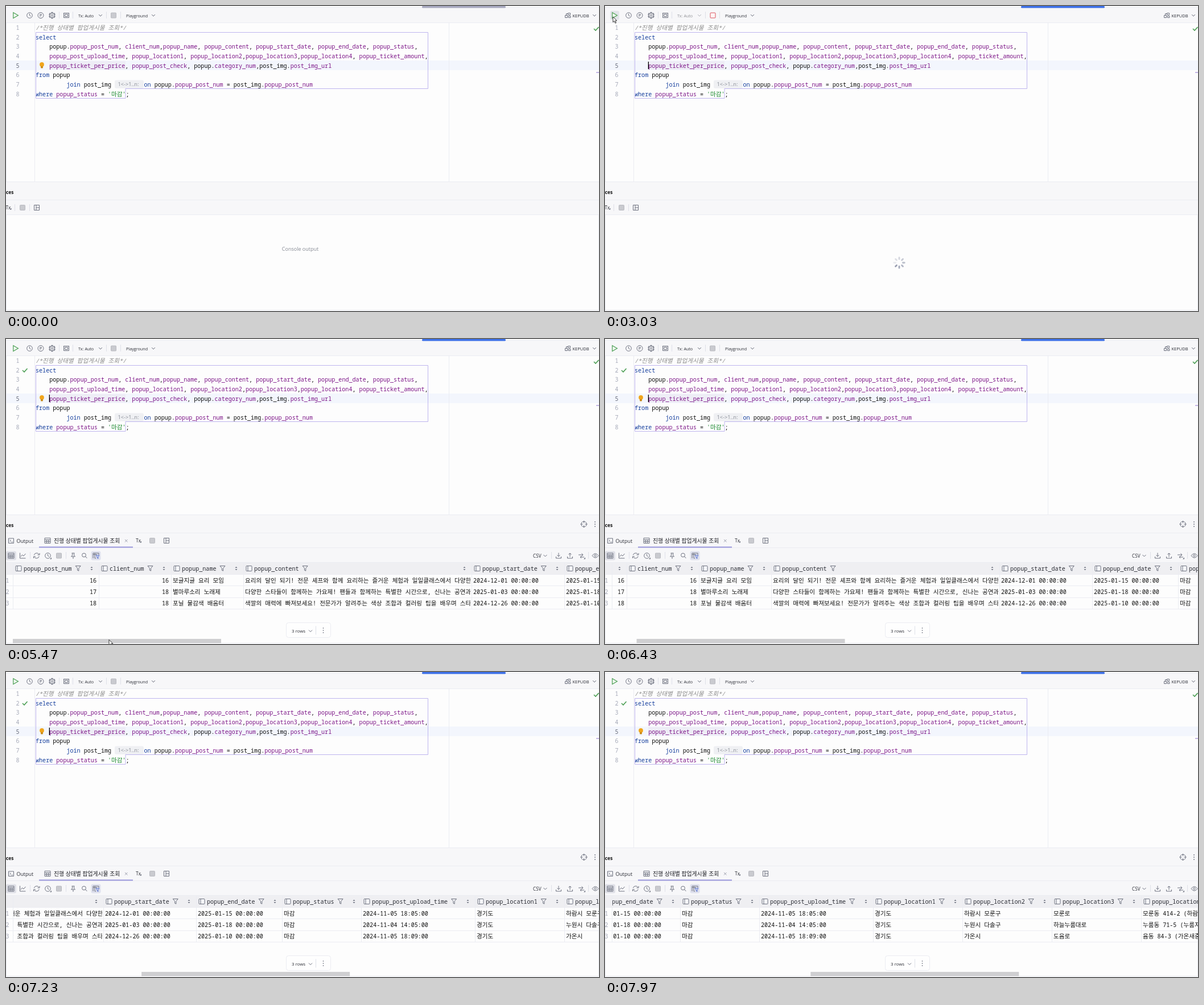
Recreate the animation shown at these times as an HTML page. Size 1042x537 px, loop 8 s.

```html
<!DOCTYPE html>
<html lang="ko">
<head>
<meta charset="utf-8">
<title>SQL console</title>
<style>
html, body { margin: 0; width: 100%; height: 100%; overflow: hidden; background: #fdfdfd; }
svg { display: block; width: 1042px; height: 537px; }
text { white-space: pre; font-family: "Open Sans", "Noto Sans CJK KR", sans-serif; }
.mono { font-family: "Noto Sans Mono", "Noto Sans CJK KR", monospace; font-size: 10.08px; }
</style>
</head>
<body>
<svg id="stage" viewBox="0 0 1042 537"></svg>
<script>
const LOOP = 8000, FOCUS = 2450, RUN = 2570, DONE = 4350;
const INK = '#6c707e', LINE = '#ebecf2', PANEL = '#f7f7f9', GREEN = '#4c9f54';

// Markup helpers
const rect = (x, y, w, h, fill, more = '') => `<rect x="${x}" y="${y}" width="${w}" height="${h}" fill="${fill}" ${more}/>`;
const path = (d, stroke = INK, fill = 'none', width = 1) => `<path d="${d}" stroke="${stroke}" fill="${fill}" stroke-width="${width}"/>`;
const circle = (x, y, r, stroke = INK, fill = 'none') => `<circle cx="${x}" cy="${y}" r="${r}" stroke="${stroke}" fill="${fill}"/>`;
const hangul = s => s.replace(/[가-힣]+/g, m => `<tspan font-size="10.57">${m}</tspan>`);
const mono = (x, y, s, fill = '#111', more = '') => `<text class="mono" x="${x}" y="${y}" fill="${fill}" ${more}>${hangul(s)}</text>`;
const label = (x, y, s, size, fill = '#2b2d35', more = '') => `<text x="${x}" y="${y}" font-size="${size}" fill="${fill}" ${more}>${s}</text>`;
const group = (id, body) => `<g id="${id}">${body}</g>`;

// Icons, placed by their centre
const chevron = (x, y) => path(`M${x - 3} ${y - 1.5}l3 3 3-3`);
const divider = (x, y, h = 12) => path(`M${x + .5} ${y - h / 2}v${h}`, '#dfe0e8');
const check = (x, y) => path(`M${x - 4} ${y}l3 3 5.5-6`, GREEN, 'none', 1.6);
const clock = (x, y) => circle(x, y, 4.8) + path(`M${x} ${y - 3}v3.2l2.2 1.3`);
const stopped = (x, y) => rect(x - 4.5, y - 4.5, 9, 9, '#c9cacf', 'rx="1" stroke="#b9bac0"');
const panes = (x, y) => path(`M${x - 4.5} ${y - 4.5}h9v9h-9zM${x - 1} ${y - 4.5}v9M${x - 1} ${y}h5.5`);
const table = (x, y) => path(`M${x - 5} ${y - 4.5}h10v9h-10zM${x - 5} ${y - 1.5}h10M${x - 5} ${y + 1.5}h10M${x - 1.7} ${y - 1.5}v6M${x + 1.7} ${y - 1.5}v6`);
const kebab = (x, y) => [-4, 0, 4].map(d => circle(x, y + d, .5, INK, INK)).join('');
const column = (x, y) => rect(x - 5, y - 4.5, 10, 9, '#f7f8fb', `rx="1" stroke="${INK}"`) + path(`M${x - 2} ${y - 4.5}v9`);
const funnel = (x, y) => path(`M${x - 4.5} ${y - 4.5}h9l-3.4 4.2v4.5l-2.2-1v-3.5z`);
const sorter = (x, y) => path(`M${x - 2} ${y - 1}l2-2.2 2 2.2zM${x - 2} ${y + 1}l2 2.2 2-2.2z`, 'none', INK);
const gear = (x, y) => [0, 60, 120].map(a => `<g transform="rotate(${a} ${x} ${y})">${path(`M${x - 1.3} ${y - 4}v-1.3h2.6v1.3M${x - 1.3} ${y + 4}v1.3h2.6v-1.3`)}</g>`).join('') + circle(x, y, 4) + circle(x, y, 1.5);

// Editor
const code = [
  '/*진행 상태별 팝업게시물 조회*/',
  'select',
  '    popup.popup_post_num, client_num,popup_name, popup_content, popup_start_date, popup_end_date, popup_status,',
  '    popup_post_upload_time, popup_location1, popup_location2,popup_location3,popup_location4, popup_ticket_amount,',
  '    popup_ticket_per_price, popup_post_check, popup.category_num,post_img.post_img_url',
  'from popup',
  '         join post_img ',
  "where popup_status = '마감';"
];
const wordColor = w =>
  w[0] === "'" ? '#16862a' :
  /^(select|from|join|on|where)$/.test(w) ? '#123c9c' :
  /^(popup|post_img)$/.test(w) ? '#111' : '#7d1688';
const paint = s => s.replace(/'[^']*'|\w+/g, w => `<tspan fill="${wordColor(w)}">${w}</tspan>`);
const source = (x, y, s) => mono(x, y, paint(s));
const base = i => Math.round(42 + 16.65 * i);

const editor = () =>
  rect(0, 96, 1042, 17, '#f3f6fd') + rect(76, 97, 134, 15, '#eeedf6') +
  path('M.5 29V309M50.5 29V309M778.5 29V309', LINE) +
  code.map((s, i) =>
    mono(17.5, base(i), String(i + 1), i === 4 ? '#686c7c' : '#a5a9b8') +
    (i ? source(52, base(i), s) : mono(52, base(i), s, '#8c8c8c', 'font-style="italic"'))).join('') +
  rect(191, 130.5, 51, 14.5, '#eff0f3', 'rx="3"') + label(196.5, 141, '1&lt;-&gt;1..n:', 9.2, '#868a94') +
  source(242.5, base(6), 'on popup.popup_post_num = post_img.popup_post_num') +
  path('M52.5 46.5H741.5V145.5H210V162.5H52.5Z', '#beb5ee') +
  check(1037, 40) + path('M1037 117h5', '#b3a0e0', 'none', 1.5);

const toolbar = () =>
  rect(0, 3, 1042, 26, PANEL) + path('M0 2.5H1042M0 29.5H1042', LINE) +
  rect(731, 0, 147, 3.5, '#a8a9c0', 'id="tab" rx="1.5"') +
  group('hover', rect(9, 8.5, 16, 16, '#e2e4ea', 'rx="3"')) +
  path('M12.8 11.5v10l8.6-5z', GREEN, '#f0f8f0', 1.2) +
  clock(41.5, 16.5) + circle(61, 16.5, 5) + label(58.8, 19.3, 'P', 7.5, INK, 'font-weight="600"') + gear(81, 16.5) +
  divider(93, 16) + path('M101.5 12.5h9v8h-9zM103.5 14.5h5v4h-5zM101 12.5h10') + divider(117, 16) +
  group('tx', label(127, 19.5, 'Tx: Auto', 7.2) + chevron(166, 16.5)) + divider(176, 16) +
  group('idle', stopped(189, 16.5)) +
  group('stop', rect(185, 12, 9, 9, '#fff5f5', 'rx="1" stroke="#d9535f"')) +
  divider(201, 16) + label(211, 19.5, 'Playground', 7.2) + chevron(259, 16.5) +
  path('M982.5 16.5h4v4h-4zM987.5 12.5h4v3h-4zM988.5 17.5h3.5v3h-3.5zM984.5 16v-2.5h3') +
  label(995.5, 19.5, 'KEPUDB', 7.5) + chevron(1034, 16.5);

const frame = () =>
  rect(0, 309.5, 1042, 58, PANEL) + path('M0 309.5H1042M0 341.5H1042M0 367.5H1042M0 535.5H1041.5V368M.5 368V535', LINE) +
  label(0, 331, 'ces', 8.4, '#111', 'font-weight="700"');

const txIcon = x => label(x, 358, 'Tx', 8.5) + path(`M${x + 10} 355.5v3h-3z`, 'none', INK);

const blank = () =>
  txIcon(-.5) + divider(15, 355) + stopped(29, 355) + divider(41, 355) + panes(54, 355);

const spinner = () => [...Array(8)].map((_, k) =>
  `<rect class="spoke" x="522" y="450.6" width="5.6" height="2.8" rx="1.4" fill="#9a9fb2" transform="rotate(${k * 45} 517 452)"/>`).join('');

// Result grid: [left edge, name, cells]
const stamp = (...days) => days.map(d => d + ' 00:00:00');
const columns = [
  [12, 'popup_post_num', ['16', '17', '18']],
  [163, 'client_num', ['16', '18', '18']],
  [290, 'popup_name', ['보글지글 요리 모임', '별마루소리 노래제', '포닐 물감색 배움터']],
  [417, 'popup_content', [
    '요리의 달인 되기! 전문 셰프와 함께 요리하는 즐거운 체험과 일일클래스에서 다양한',
    '다양한 스타들이 함께하는 가요제! 팬들과 함께하는 특별한 시간으로, 신나는 공연과',
    '색깔의 매력에 빠져보세요! 전문가가 알려주는 색상 조합과 컬러링 팁을 배우며 스타']],
  [818, 'popup_start_date', stamp('2024-12-01', '2025-01-03', '2024-12-26')],
  [981, 'popup_end_date', stamp('2025-01-15', '2025-01-18', '2025-01-10')],
  [1132, 'popup_status', ['마감', '마감', '마감']],
  [1271, 'popup_post_upload_time', ['2024-11-05 18:05:00', '2024-11-04 14:05:00', '2024-11-05 18:09:00']],
  [1471, 'popup_location1', ['경기도', '경기도', '경기도']],
  [1628, 'popup_location2', ['하람시 모룬구', '누원시 다솔구', '가온시']],
  [1785, 'popup_location3', ['모룬로', '하늘누룸대로', '도윰로']],
  [1942, 'popup_location4', ['모룬동 414-2 (하람', '누룸동 71-5 (누룸지', '윰동 84-3 (가온새중']],
  [2100]
];
const rowBase = i => 429 + 20 * i;

const grid = () => columns.slice(0, -1).map(([x, name, cells], n) => {
  const end = columns[n + 1][0];
  const body = cells.map((s, i) => n < 2
    ? mono(end - 4, rowBase(i), s, '#111', 'text-anchor="end"')
    : mono(x + 3, rowBase(i), s)).join('');
  return `<clipPath id="col${n}"><rect x="${x}" y="393" width="${end - x - 2}" height="83"/></clipPath>` +
    `<g clip-path="url(#col${n})">${body}</g>` +
    column(x + 10, 404) + mono(x + 19, 408, name, '#2b2d35') +
    funnel(x + 30 + name.length * 6.05, 404) + sorter(end - 12.5, 404) + path(`M${end + .5} 393V475`, LINE);
}).join('');

const results = () =>
  circle(1015.5, 326, 4.8) + path('M1015.5 320v4M1015.5 328v4M1009.5 326h4M1017.5 326h4') + kebab(1035, 326) +
  path('M4.5 351h9v8.5h-9zM6.5 353.5l2 1.7-2 1.7M9.5 357.5h2.5') + label(18.5, 359, 'Output', 8.9) +
  table(73, 355) + label(84, 359, '진행 상태별 팝업게시물 조회', 9.85, '#1e1f25') +
  path('M209 353l4.5 4.5M213.5 353l-4.5 4.5', '#9a9dab') + rect(58, 365.5, 165, 2, '#9a98dc') +
  txIcon(228) + stopped(257, 355) + panes(282, 355) +
  rect(0, 368, 1041, 25, PANEL) +
  rect(0, 373.5, 18, 16, '#dfe0e7', 'rx="3"') + table(9, 381.5) +
  path('M24.5 376.5v9.5h10M26 383l2.5-3 2.5 2 3.5-4') + divider(42, 381) +
  path('M49.3 380.5a4.7 4.7 0 0 1 8.5-1.5M58.2 382.5a4.7 4.7 0 0 1-8.5 1.5M55.5 380h3.5v-3M52 383h-3.5v3') +
  clock(73.5, 381.5) + path('M80 384.5v3h-3z', 'none', INK) + stopped(93, 381.5) + divider(105, 381) +
  path('M115.5 377h5M116.5 377v4l-2 2h7l-2-2v-4M118 383v4') +
  circle(137, 380.5, 3.4) + path('M139.6 383l2.8 3') +
  rect(149.5, 373.5, 17, 16, '#dfe1ee', 'rx="3"') + path('M153 386v-9h10v3M153 379.5h7M156 377v9h2') +
  path('M158 381h6l-2 2.5v3l-1.8-1v-2z', '#5570d0') +
  label(926, 384.5, 'CSV', 8.2) + chevron(947.5, 381.5) + divider(958, 381) +
  path('M971 376.5v6M968.5 380.5l2.5 2.5 2.5-2.5M966.5 383v3h9v-3') +
  path('M991 383.5v-6M988.5 379.5l2.5-2.5 2.5 2.5M986.5 383v3h9v-3') +
  path('M1006 380h8M1011.5 377.5l2.5 2.5-2.5 2.5M1016 384h-7M1011 382l-2 2 2 2') + path('M1018 384.5v3h-3z', 'none', INK) + divider(1023, 381) +
  path('M1030 381.5q5.5-7.5 11 0q-5.5 7.5-11 0') + circle(1035.5, 381.5, 1.7) +
  rect(0, 393, 1041, 21, '#efeff2') +
  path('M0 393.5H1041M0 414.5H1041M0 434.5H1041M0 455.5H1041M0 475.5H1041', LINE) +
  `<clipPath id="view"><rect x="12" y="393" width="1030" height="83"/></clipPath><g clip-path="url(#view)">${group('cells', grid())}</g>` +
  path('M12.5 393V475', LINE) + [0, 1, 2].map(i => mono(-.5, rowBase(i), String(i + 1), '#a5a9b8')).join('') +
  rect(492.5, 499.5, 78, 26, '#fefefe', `rx="4" stroke="${LINE}"`) +
  label(502, 516.5, '3 rows', 7.9) + chevron(535, 514) + divider(544, 513, 15) + kebab(557.5, 513) +
  rect(12, 528, 366, 7.5, '#cfcfd1', 'id="thumb"');

const bulb = circle(63, 103, 3.9, 'none', '#f0a51c') + rect(61, 106, 4, 3.6, '#c98a1a', 'rx="1"');

document.getElementById('stage').innerHTML =
  toolbar() + editor() + group('bulb', bulb) + rect(75.7, 98, 1.3, 13, '#000', 'id="caret"') +
  frame() + group('blank', blank()) +
  label(517, 430.5, 'Console output', 9, '#868a94', 'id="hint" text-anchor="middle"') +
  group('spinner', spinner()) + group('results', results()) + group('done', check(33, 55)) +
  group('mouse', path('M0 0v9.5l2.3-2 1.7 3.8 1.6-.7-1.7-3.7h3z', '#222', '#fff', .9));

// Motion
const el = id => document.getElementById(id);
const show = (id, on) => el(id).style.display = on ? '' : 'none';
const spokes = document.querySelectorAll('.spoke');
const smooth = u => u * u * (3 - 2 * u);

function along(keys, t, ease = u => u) {
  if (t <= keys[0][0]) return keys[0].slice(1);
  for (let i = 1; i < keys.length; i++) {
    const [a, ...from] = keys[i - 1], [b, ...to] = keys[i];
    if (t < b) return from.map((v, k) => v + (to[k] - v) * ease((t - a) / (b - a)));
  }
  return keys[keys.length - 1].slice(1);
}

const mousePath = [[1800, 110, -14], [2350, 14, 19], [4500, 14, 19], [5250, 181, 529.5], [5700, 181, 529.5], [5950, 182, 545]];
const scrollPath = [[6050, 0], [6430, 124], [7230, 647], [7970, 1000]];

function draw(t) {
  const running = t >= RUN && t < DONE, done = t >= DONE, focused = t >= FOCUS;
  const [mx, my] = along(mousePath, t, smooth);
  const [scroll] = along(scrollPath, t);
  el('tab').setAttribute('fill', focused ? '#3d70e8' : '#a8a9c0');
  el('tx').setAttribute('opacity', running ? .5 : 1);
  show('hover', mx < 25 && my > 8 && my < 25);
  show('idle', !running);
  show('stop', running);
  show('bulb', !running);
  show('caret', focused && t % 1000 < 500);
  show('blank', !done);
  show('hint', t < RUN);
  show('spinner', running);
  show('results', done);
  show('done', done);
  const step = Math.floor(t / 125) % 8;
  spokes.forEach((s, k) => s.setAttribute('opacity', .2 + .8 * ((k + 12 - step) % 8) / 7));
  el('cells').setAttribute('transform', `translate(${-Math.round(scroll)} 0)`);
  el('thumb').setAttribute('x', 12 + scroll / 2.863);
  el('mouse').setAttribute('transform', `translate(${mx} ${my})`);
}

function tick() {
  draw(performance.now() % LOOP);
  requestAnimationFrame(tick);
}
tick();
</script>
</body>
</html>
```
